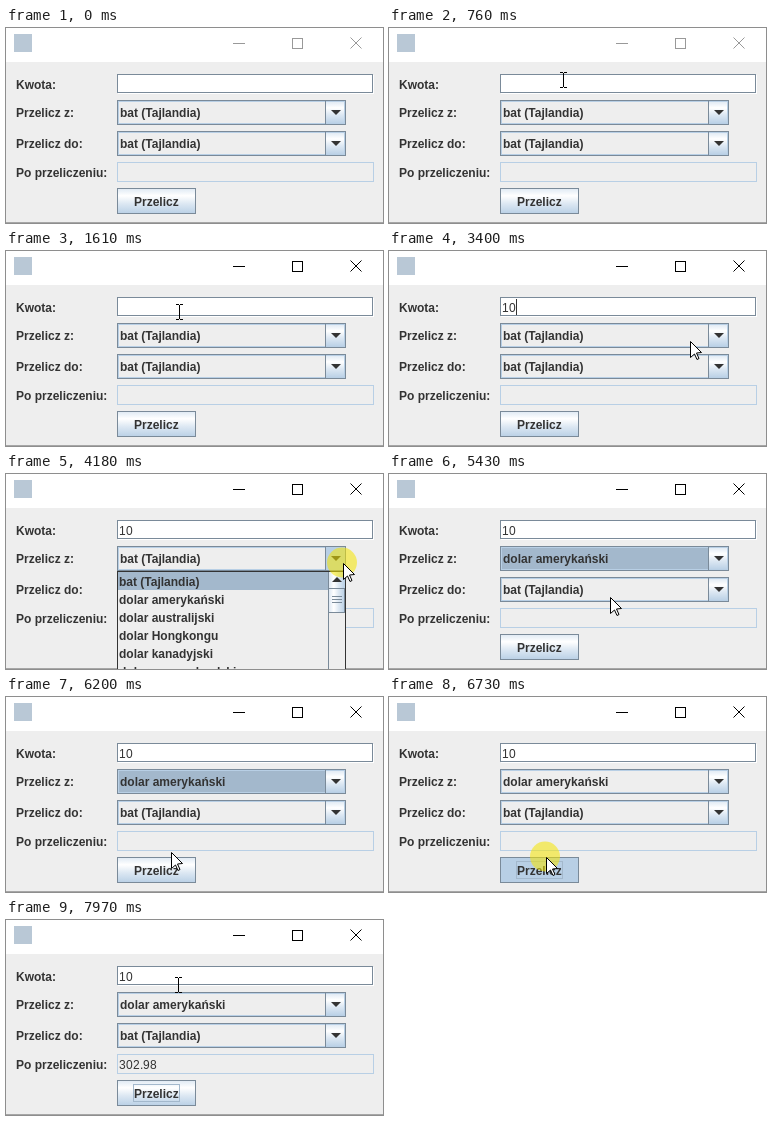
An HTML page with a canvas that plays this animation: 377 by 195 pixels, repeating every 8000 ms.

```html
<!DOCTYPE html>
<html lang="pl">
<meta charset="utf-8">
<title>Przelicz</title>
<style>
  html, body { margin: 0; width: 100%; height: 100%; overflow: hidden; background: #eee; }
  canvas { display: block; }
</style>
<canvas width="377" height="195"></canvas>
<script>
const ctx = document.querySelector('canvas').getContext('2d');
const LOOP = 8000;
const INK = '#333', EDGE = '#7a8a99', PALE = '#b8cfe5', SELECTED = '#a3b8cc', PANEL = '#eee';
const CURRENCIES = ['bat (Tajlandia)', 'dolar amerykański', 'dolar australijski',
  'dolar Hongkongu', 'dolar kanadyjski', 'dolar nowozelandzki'];

// Pointer moves: start, end, number of steps, target x, target y
const MOVES = [
  [70, 290, 4, 178, 25], [460, 840, 6, 173, 61], [2860, 3400, 8, 301, 90],
  [3550, 3860, 5, 337, 89], [4650, 4880, 4, 221, 123],
  [5740, 6350, 9, 157, 160], [7590, 7970, 6, 172, 65]
];
const CLICKS = [[1070, 1230], [4180, 4340], [5340, 5430], [6730, 6900]];
const CARET_ON = [[1070, 1610], [2080, 2710], [3240, 3700]];

const within = (t, [from, to]) => t >= from && t < to;
const ease = p => p * p * (3 - 2 * p);

function pointerAt(t) {
  let x = 328, y = 215;
  for (const [start, end, steps, toX, toY] of MOVES) {
    if (t < start) break;
    const step = Math.floor((t - start) / (end - start) * (steps - 1) + 1e-6);
    const p = ease(Math.min(1, (step + 1) / steps));
    x += (toX - x) * p;
    y += (toY - y) * p;
    if (p < 1) break;
  }
  return { x: Math.round(x), y: Math.round(y) };
}

function rect(x, y, w, h, fill) {
  ctx.fillStyle = fill;
  ctx.fillRect(x, y, w, h);
}

function outline(x, y, w, h, color) {
  ctx.strokeStyle = color;
  ctx.lineWidth = 1;
  ctx.strokeRect(x + .5, y + .5, w - 1, h - 1);
}

function text(str, x, baseline, weight = 'bold') {
  ctx.font = `${weight} 12px "Liberation Sans", Arial, sans-serif`;
  ctx.fillStyle = INK;
  ctx.fillText(str, x, baseline);
}

function digits(str, x, baseline) {
  for (const ch of str) {
    text(ch, x, baseline, 'normal');
    x += ch === '.' ? 3 : 7;
  }
}

function shape(points, fill, stroke) {
  ctx.beginPath();
  points.forEach(([x, y]) => ctx.lineTo(x, y));
  ctx.closePath();
  ctx.fillStyle = fill;
  ctx.fill();
  if (stroke) {
    ctx.strokeStyle = stroke;
    ctx.lineWidth = 1;
    ctx.stroke();
  }
}

function sheen(x, y, w, h, sideways) {
  const g = sideways ? ctx.createLinearGradient(x, 0, x + w, 0) : ctx.createLinearGradient(0, y, 0, y + h);
  g.addColorStop(0, '#dde8f3');
  g.addColorStop(.3, '#fff');
  g.addColorStop(.6, '#dde8f3');
  g.addColorStop(1, PALE);
  rect(x, y, w, h, g);
}

function titleBar(active) {
  rect(0, 0, 377, 34, '#fff');
  rect(8, 6, 18, 18, '#b9c8d6');
  const color = active ? '#000' : '#999';
  rect(227, 15, 12, 1, color);
  outline(286, 10, 11, 11, color);
  ctx.beginPath();
  ctx.moveTo(344.5, 9.5); ctx.lineTo(355.5, 20.5);
  ctx.moveTo(355.5, 9.5); ctx.lineTo(344.5, 20.5);
  ctx.stroke();
}

function combo(y, value, focused, pressed) {
  rect(111, y, 229, 25, PANEL);
  if (focused) rect(113, y + 2, 206, 21, SELECTED);
  if (pressed) rect(320, y + 1, 19, 23, PALE);
  else sheen(320, y + 1, 19, 23);
  outline(112, y + 1, 227, 23, PALE);
  outline(111, y, 229, 25, EDGE);
  rect(319, y + 1, 1, 23, EDGE);
  shape([[325, y + 10], [335, y + 10], [330, y + 15]], INK);
  text(value, 114, y + 17);
}

function button(hover, pressed, focused) {
  if (pressed) rect(111, 160, 79, 26, PALE);
  else sheen(111, 160, 79, 26);
  if (hover && !pressed) {
    outline(112, 161, 77, 24, PALE);
    outline(113, 162, 75, 22, PALE);
  }
  outline(111, 160, 79, 26, EDGE);
  text('Przelicz', 128, 178);
  if (focused) outline(127, 164, 47, 18, SELECTED);
}

function popup(pointer) {
  rect(111, 97, 229, 98, PANEL);
  const row = pointer.y >= 98 && pointer.x < 322 ? Math.floor((pointer.y - 98) / 18) : 0;
  rect(112, 98 + row * 18, 210, 18, SELECTED);
  CURRENCIES.forEach((name, i) => text(name, 113, 112 + i * 18));
  rect(322, 98, 1, 97, EDGE);
  sheen(323, 98, 16, 16, true);
  shape([[326, 108], [336, 108], [331, 103]], INK);
  sheen(323, 114, 16, 24, true);
  outline(322, 114, 17, 25, EDGE);
  for (let y = 122; y <= 130; y += 3) rect(326, y, 10, 1, EDGE);
  outline(111, 97, 229, 110, INK);
}

function cursor({ x, y }) {
  const overField = x >= 111 && x < 368 && (y >= 46 && y < 66 || y >= 134 && y < 154);
  if (overField) {
    rect(x, y - 7, 1, 14, '#000');
    for (const dy of [-8, 7]) {
      rect(x - 3, y + dy, 3, 1, '#000');
      rect(x + 1, y + dy, 3, 1, '#000');
    }
    return;
  }
  const arrow = [[0, 0], [0, 16], [4, 12.5], [6.5, 18], [8.5, 17], [6, 11.5], [11, 11]];
  shape(arrow.map(([dx, dy]) => [x + dx + .5, y + dy + .5]), '#fff', '#000');
}

function draw(t) {
  const pointer = pointerAt(t);
  const open = within(t, [4180, 5430]);
  const hover = pointer.x >= 111 && pointer.x < 190 && pointer.y >= 160 && pointer.y < 186;

  rect(0, 0, 377, 195, PANEL);
  titleBar(t >= 1070);
  rect(0, 194, 377, 1, '#a6a6a6');

  text('Kwota:', 10, 61);
  text('Przelicz z:', 10, 89);
  text('Przelicz do:', 10, 120);
  text('Po przeliczeniu:', 10, 149);

  rect(112, 47, 256, 19, '#fff');
  outline(111, 46, 256, 19, EDGE);
  const amount = t < 2080 ? '' : t < 2250 ? '1' : '10';
  digits(amount, 113, 61);
  if (CARET_ON.some(span => within(t, span))) rect(113 + amount.length * 7, 48, 1, 16, INK);

  combo(72, CURRENCIES[t < 5430 ? 0 : 1], within(t, [5430, 6730]), within(t, CLICKS[1]));
  combo(103, CURRENCIES[0]);
  outline(111, 134, 257, 20, PALE);
  if (t >= 6900) digits('302.98', 113, 149);
  button(hover, within(t, CLICKS[3]), t >= 6730);
  if (open) popup(pointer);

  if (CLICKS.some(span => within(t, span))) {
    ctx.beginPath();
    ctx.arc(pointer.x - 1, pointer.y - .5, 15, 0, Math.PI * 2);
    ctx.fillStyle = 'rgba(245, 230, 0, .55)';
    ctx.fill();
  }
  if (t >= 70) cursor(pointer);
}

const start = performance.now();
function tick() {
  draw((performance.now() - start) % LOOP);
  requestAnimationFrame(tick);
}
tick();
</script>
</html>
```
